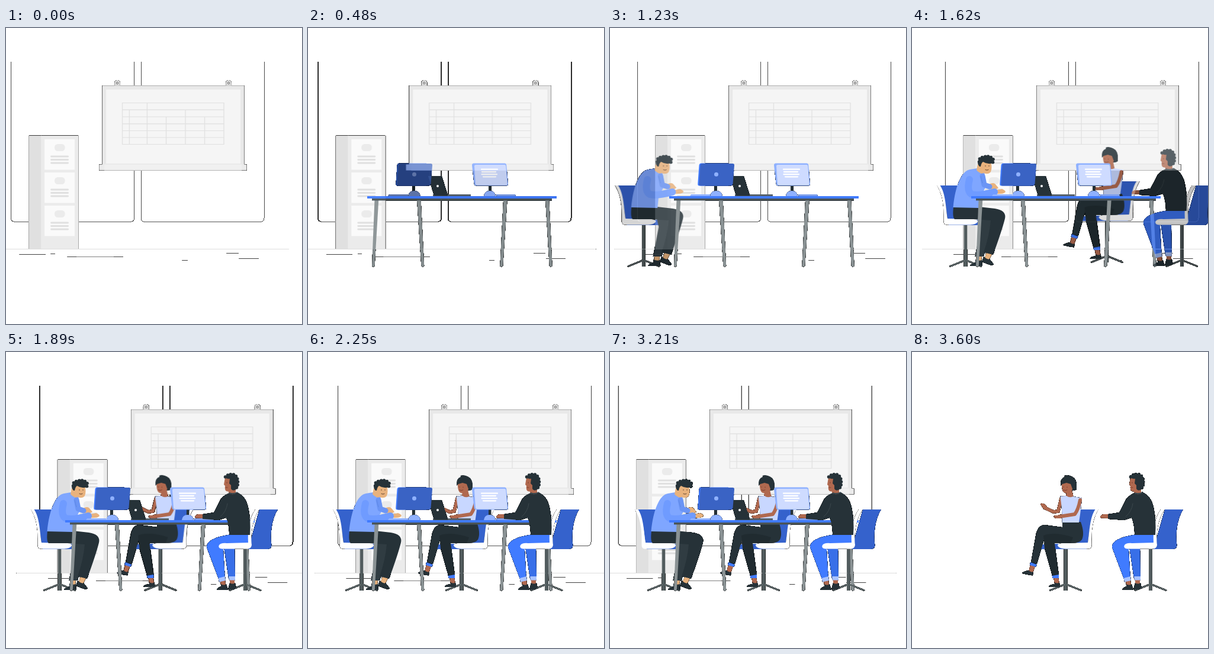
Recreate the animation shown at these times as an HTML page. Size 500 px wide and 500 px high, loop 3630 ms.

```html
<!DOCTYPE html>
<html lang="en">
<head>
<meta charset="utf-8">
<title>Team at a desk</title>
<style>
  html, body { margin: 0; width: 100%; height: 100%; overflow: hidden; background: #fff; }
  svg { display: block; width: 500px; height: 500px; }

  #room, #host, #desk, #left, #right, #guestA, #guestB, #cutHost, #cutDesk {
    animation: 3.63s linear infinite;
  }
  #room { animation-name: sway, cut; animation-delay: -12ms, 0s; }
  #cutHost, #cutDesk { animation-name: cut; }
  #desk { animation-name: fadeDesk; }
  #right { animation-name: fadeRight; }
  #left { animation-name: fadeLeft; }
  #host { animation-name: moveHost, fadeHost; }
  #guestA { animation-name: moveA, fadeA; }
  #guestB { animation-name: moveB, fadeB; }

  @keyframes sway {
    0%, 100% { transform: translateX(0); animation-timing-function: cubic-bezier(.37, 0, .63, 1); }
    50% { transform: translateX(49px); animation-timing-function: cubic-bezier(.37, 0, .63, 1); }
  }
  @keyframes cut { 0%, 98.75% { opacity: 1; } 98.76%, 100% { opacity: 0; } }
  @keyframes fadeDesk { 0%, 1.65% { opacity: 0; } 13.8%, 100% { opacity: 1; } }
  @keyframes fadeRight { 0%, 2.75% { opacity: 0; } 14%, 100% { opacity: 1; } }
  @keyframes fadeLeft { 0%, 6.9% { opacity: 0; } 16.6%, 100% { opacity: 1; } }
  @keyframes fadeHost { 0%, 21.5% { opacity: 0; } 36.3%, 100% { opacity: 1; } }
  @keyframes fadeA { 0%, 33.9% { opacity: 0; } 46.3%, 100% { opacity: 1; } }
  @keyframes fadeB { 0%, 34.7% { opacity: 0; } 47.9%, 100% { opacity: 1; } }
  @keyframes moveHost {
    0%, 21.5% { transform: translateX(-120px); animation-timing-function: cubic-bezier(.37, 0, .63, 1); }
    40.8%, 100% { transform: none; }
  }
  @keyframes moveA {
    0%, 33.9% { transform: translate(170px, -17px); animation-timing-function: cubic-bezier(.37, 0, .63, 1); }
    53.2%, 100% { transform: none; }
  }
  @keyframes moveB {
    0%, 34.7% { transform: translateX(120px); animation-timing-function: cubic-bezier(.37, 0, .63, 1); }
    53.2%, 100% { transform: none; }
  }

  .ink { fill: #263238; }
  .blue { fill: #3562cc; }
  .jean { fill: #407bff; }
  .sky { fill: #8fb1ff; }
  .tan { fill: #e8b27d; }
  .brown { fill: #b0694f; }
  .white { fill: #fff; }
  .steel { fill: #5b6567; }
  .line { fill: none; stroke-linecap: round; stroke-linejoin: round; }
  .curl { fill: none; stroke: #263238; stroke-width: 5.5; stroke-linecap: round; stroke-dasharray: 0 5; }
</style>
</head>
<body>
<svg viewBox="0 0 500 500">
  <defs>
    <!-- Partly covered pixels are blended onto black -->
    <filter id="matte" filterUnits="userSpaceOnUse" x="0" y="0" width="500" height="500" color-interpolation-filters="sRGB">
      <feColorMatrix in="SourceAlpha" values="0 0 0 0 0  0 0 0 0 0  0 0 0 0 0  0 0 0 12 -2"/>
      <feMerge><feMergeNode/><feMergeNode in="SourceGraphic"/></feMerge>
    </filter>
    <path id="pane" d="M8.5 57V321Q8.5 327.3 15 327.3H210Q216.5 327.3 216.5 321V57"/>
    <g id="drawer">
      <rect x="65" y="188" width="51" height="51.5" fill="#fafafa"/>
      <rect x="82" y="196" width="17.5" height="12" rx="5.5" fill="#ebebeb"/>
      <path class="line" d="M76.5 217H104.5M76.5 222.5H104.5M76.5 228H104.5" stroke="#e0e0e0" stroke-width="2.8"/>
    </g>
    <g id="hook">
      <path d="M-4.8 97.5V92.5Q-4.8 88 0 88Q4.8 88 4.8 92.5V97.5Z" fill="#dcdcdc"/>
      <circle cy="93" r="1.6" fill="#f5f5f5" stroke="#444" stroke-width=".8"/>
    </g>
    <g id="post">
      <path class="steel" d="M-2.8 332H2.8V403H-2.8Z"/>
      <path class="line" d="M0 392L-26 402.5M0 392L26 402.5" stroke="#5b6567" stroke-width="2.6"/>
      <path d="M.6 333V402" stroke="#3e484a" stroke-width="1"/>
    </g>
    <g id="seat">
      <path class="blue" d="M46 266H79V324H128V333H62C57 310 58 285 46 266Z"/>
      <path class="white" d="M42 266H47.5C57 280 57 304 60 322L104 323Q113 324 110.5 328Q107 332.4 98 332.4H58Q53 332 53.5 325C54 300 52 282 42 266Z"/>
    </g>
  </defs>

  <g filter="url(#matte)">
    <g id="room">
      <g fill="none" stroke="#555" shape-rendering="crispEdges">
        <use href="#pane"/>
        <use href="#pane" x="219.5"/>
      </g>
      <path d="M-31 373.5H478" stroke="#dedede"/>
      <path d="M22 382.5H67M75 381.5H83M103 386.5H198M297 392.5H307M372 380.5H393M393 389.5H427" stroke="#ebebeb" stroke-width=".25"/>
      <path d="M119 386.5H182" stroke="#ebebeb" stroke-width=".4"/>

      <path d="M38.2 181.7H60V373H38.2Z" fill="#e0e0e0"/>
      <path d="M59 181.7H122.7V373H59Z" fill="#ebebeb"/>
      <use href="#drawer"/>
      <use href="#drawer" y="56"/>
      <use href="#drawer" y="112"/>

      <use href="#hook" x="188"/>
      <use href="#hook" x="376"/>
      <path d="M162.5 97.3H402.5V231H162.5Z" fill="#e8e8e8"/>
      <path d="M169 104H396V229H169Z" fill="#f5f5f5"/>
      <path d="M157.3 230.5H406.5V240.6H157.3Z" fill="#ebebeb"/>
      <path d="M166 230.5H398V240.6H166Z" fill="#f0f0f0"/>
      <path fill="none" stroke="#e0e0e0" stroke-width="1.2" d="M196.5 126.5H368V196.5H196.5ZM196.5 138.2H368M196.5 150H368M196.5 161.8H368M196.5 173.5H368M196.5 185H368M208.3 138V196.5M238.3 126.5V196.5M270.5 150V196.5M303 138V196.5M335.5 150V196.5"/>
    </g>

    <g id="cutHost"><g id="host">
      <use href="#post" x="90.5"/>
      <use href="#seat"/>
      <path class="tan" d="M109 383H118L117 394H108ZM126 379L135 382L130 392L123 388Z"/>
      <path class="ink" d="M107 391Q113 394 118 392L119 402H98Q98 399 107 396ZM121 386Q127 392 131 390L138 399Q136 402 131 400L118 395Z"/>
      <path d="M112 318L138 320L121 386H106.5L116 336Z" fill="#303c42"/>
      <path class="ink" d="M70 302H113L140 305Q160 308 157 322Q152 342 137 383L121 379Q131 350 133 325L104 323H72Q68 320 70 302Z"/>
      <path d="M98 239C84 241 73 266 69.5 303L114 304L116 284L126 266L122 243L110 237Z" fill="#7fa6ff"/>
      <path class="tan" d="M111 230L122 238L120 247Q112 244 109 240ZM130 264Q138 260 141 264L146 270L141 273L130 272Z"/>
      <path class="line" d="M119 250L122 265L131 268" stroke="#6b95f5" stroke-width="9"/>
      <path class="tan" d="M142 274L152 272Q160 275 157 278Q152 281 142 280Z"/>
      <path class="line" d="M97 256Q92 276 101 281Q113 284 139 277" stroke="#6f9bff" stroke-width="12"/>
      <path d="M116 250L119 262" stroke="#5b84e0" stroke-width=".8"/>
      <path class="tan" d="M113 225H133Q136 236 133 243Q128 249 119 244Q111 238 113 225Z"/>
      <path class="ink" d="M114 234Q109 229 113 222Q116 216 124 217Q134 215 137 222Q139 229 133 229Q126 230 120 226Q117 228 116 234Z"/>
      <path class="curl" d="M113.500 226Q113 219 119 218.500Q128 215 134 219Q139 221 136.500 227"/>
      <path class="line" d="M124 232.500V233.500M130 232.500V233.500M124 239.500Q127 241 129 239.500" stroke="#4b3528" stroke-width=".9"/>
    </g></g>

    <g id="guestA">
      <use href="#post" x="259.5"/>
      <use href="#seat" transform="translate(357 0) scale(-1 1)"/>
      <path class="blue" d="M212 325H246V333H212Z"/>
      <path class="brown" d="M200 359L208 362L204 373L197 371ZM239 380H247L249 392H241Z"/>
      <path class="ink" d="M197 369Q202 373 205 371L204 377.5Q194 376 186 374Q186 371 197 369ZM241 389Q246 392 249 389L250 397H231Q231 393 241 392Z"/>
      <path class="jean" d="M200 355L211 359L209 363L199 360ZM236.5 376H248V382H237.5Z"/>
      <path class="ink" d="M254 287H285Q292 306 287 317Q283 323 268 323L224 314L211 358L201 355L209 310Q212 292 224 292L254 296Z"/>
      <path d="M222 310Q240 303 272 313L268 323L241 323L248 376L237 378L224 332Z" fill="#202b30"/>
      <path class="ink" d="M254 222Q254 209 265 209Q276 210 278 222L278 232Q274 235 268 234H258Z"/>
      <path class="brown" d="M261 233H270L273 246H260Z"/>
      <path class="line" d="M252 248L247 269L239 270L224 263" stroke="#b0694f" stroke-width="5.5"/>
      <path class="brown" d="M228 261Q224 255 217 256Q218 261 224 266Z"/>
      <path d="M250.5 243.5L261 243Q266 247 272 244L287 246.5Q286 262 282 288H253.5Q254 268 250.5 243.5Z" fill="#c8d7ff"/>
      <path class="line" d="M284 250Q281 266 275 274L249 278" stroke="#b0694f" stroke-width="6"/>
      <path class="brown" d="M252 276L241 276Q237 279 243 281L252 281Z"/>
      <path class="brown" d="M253 218H270L271 232Q265 240 258 238Q252 236 253 218Z"/>
      <path class="ink" d="M251 226Q250 213 258 211Q256 208 262 208Q274 209 276 222L271 231L268 223L261 221L254 223Z"/>
      <path class="line" d="M256 227.5V228.5M262 228V229M256 233Q259 235 262 233" stroke="#7a3d2e" stroke-width=".9"/>
    </g>

    <g id="cutDesk">
      <g id="desk">
        <g fill="#8a9294">
          <path d="M112.5 290H119.3L112.7 402Q110.5 405 108 402Z"/>
          <path d="M184 290H190.7L196.300 402Q194 405 191.3 402Z"/>
          <path d="M330 290H336.700L329.3 402Q326.5 405 324.3 402Z"/>
          <path d="M401 290H407.3L412.7 402Q410 405 407.7 402Z"/>
        </g>
        <path d="M108 287H412V291.4H108Z" fill="#4a5458"/>
        <path class="jean" d="M100 284H420V288H100Z"/>
        <path d="M211 281H275V284H211Z" fill="#56616a"/>
        <path class="ink" d="M203 250H226L236.5 283.5H213Z"/>
        <circle class="white" cx="219" cy="267" r="2"/>
      </g>

      <g id="left">
        <path class="sky" d="M137 281H169V284H135Z"/>
        <path class="ink" d="M176.5 265H181V277H176.5Z"/>
        <path class="sky" d="M169 284Q170 275 179.5 275Q189 275 190 284Z"/>
        <path class="jean" d="M154 228.5H200V266.5H151Q148 266.5 148.3 263L150.5 232Q151 228.5 154 228.5Z"/>
        <path d="M156 229H207Q210.3 229 210 232L207.5 263Q207 266.5 204 266.5H153Q150 266.5 150.3 263L152.5 232Q153 229 156 229Z" fill="#3a63c4"/>
        <circle class="sky" cx="179.5" cy="247.3" r="3.5"/>
      </g>

      <g id="right">
        <path d="M317 281H350L351 284H319Z" fill="#7e9fec"/>
        <path class="ink" d="M305 265H309.5V277H305Z"/>
        <path class="sky" d="M297 284Q298 275 307 275Q316 275 317 284Z"/>
        <path class="sky" d="M280 228.5H332Q335 228.5 335.3 232L338 263Q338 266.5 335 266.5H284Q281 266.5 280.5 263L277 232Q277 228.5 280 228.5Z"/>
        <path d="M284 231H332Q334 231 334.2 233L336.5 263Q336.5 265.5 334 265.5H286Q283.5 265.5 283 263L281 233Q281 231 284 231Z" fill="#cedbff"/>
        <path class="line" d="M293 238.7H320M294 243H317M293.5 247.2H319M296 251.3H317" stroke="#fff" stroke-width="2.3"/>
      </g>
    </g>

    <g id="guestB">
      <use href="#post" x="403"/>
      <path class="blue" d="M427 266H458C447 284 445 308 447.5 327Q447 333 440 333H408Z"/>
      <path class="brown" d="M361 384H369L370 395H362ZM377 381H385L385 394H377Z"/>
      <path class="ink" d="M362 392Q367 395 371 392L374 402H355Q354 399 362 396ZM377 390Q382 393 386 390L388 399Q382 403 374 401Z"/>
      <path d="M366 322H385L386 383H375Z" fill="#386fe8"/>
      <path class="jean" d="M380 308H412V325L366 333L369 384L359 386L339 333Q335 324 347 317Q358 311 380 308Z"/>
      <path d="M357.5 382L369 379L370 386L359 388.5ZM375 379H386V385.5H376Z" fill="#a9c3ff"/>
      <path class="white" d="M414 266H427C415 282 412 308 414 326Q413 332.4 407 332.4H364Q357 332 358.5 327Q361 322 372 323L408 322C407 300 410 280 420 266Z"/>
      <path class="brown" d="M333 274L323 274Q316 277 319 280.5L333 281Z"/>
      <path class="ink" d="M376 238L390 237Q404 244 408 262Q413 284 411 309H376Q376 292 371 280L358 284L331 282V274L350 271L362 248Q368 241 376 238Z"/>
      <path class="line" d="M373 256Q371 270 361 278" stroke="#3b474c"/>
      <path class="brown" d="M374 226H387V239Q380 242 375 238Z"/>
      <path class="brown" d="M369 212H382V232Q377 237 371 235Q368 233 369 226L367 224Z"/>
      <path class="ink" d="M369 211Q373 206 381 206Q391 208 391 219Q392 230 386 233Q381 235 379 231V225L376 222L377 214Q372 215 369 211Z"/>
      <path class="curl" d="M369.500 211Q374 206.500 381 206.500Q390 208 390.500 219Q391 228 386 231.500"/>
      <path class="line" d="M372 220V221.5M370 229H373" stroke="#7a3d2e" stroke-width=".9"/>
      <path d="M376 238Q383 241 390 237" fill="none" stroke="#37474f" stroke-width="2"/>
    </g>
  </g>
</svg>
</body>
</html>
```
